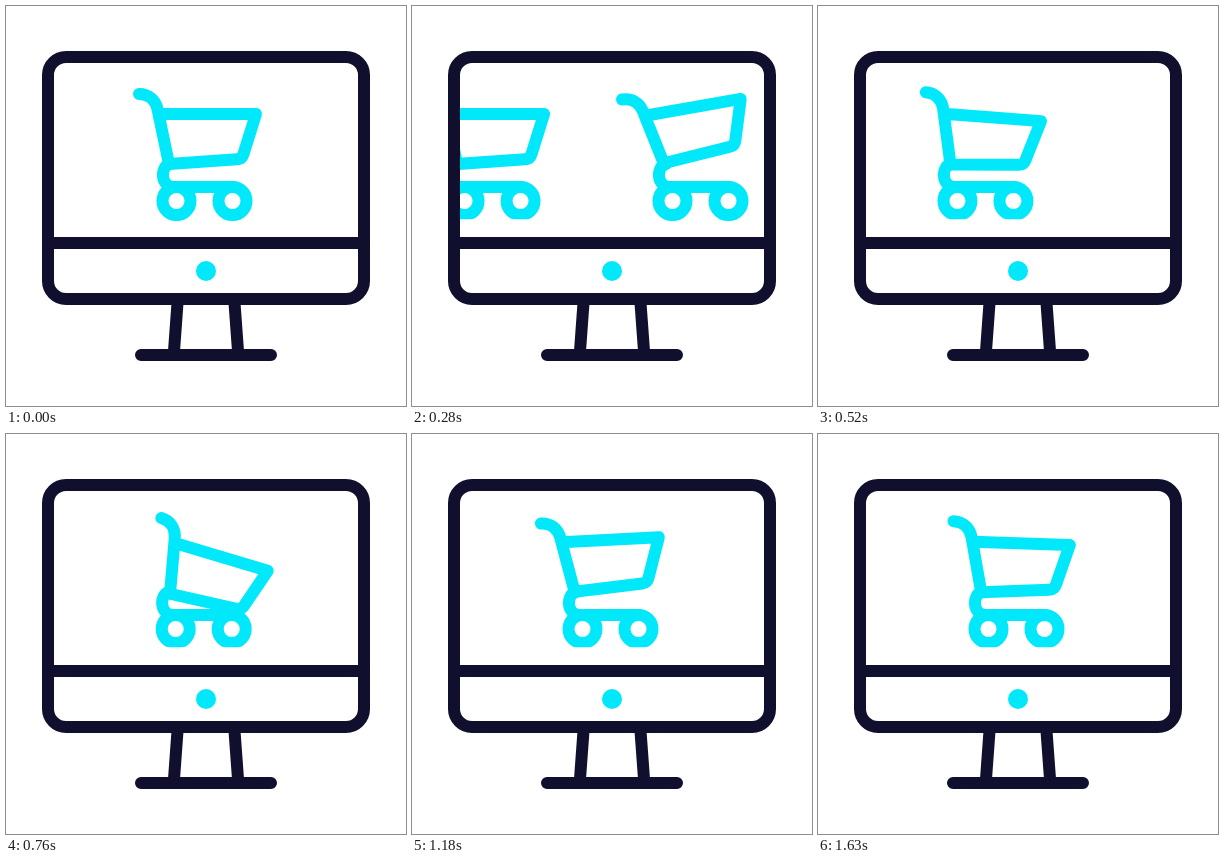
Recreate the animation shown at these times as an HTML page. Size 400 by 400 pixels, loop 1.66 s.

```html
<!DOCTYPE html>
<html lang="en">
<head>
<meta charset="utf-8">
<title>Shopping cart on a monitor</title>
<style>
  html, body { margin: 0; width: 100%; height: 100%; overflow: hidden; background: #fff; }
  svg { display: block; width: 100vw; height: 100vh; }
  .line { fill: none; stroke-width: 12; stroke-linecap: round; stroke-linejoin: round; }
  .dark { stroke: #10102e; }
  .cyan { stroke: #00e8fa; }
</style>
</head>
<body>
<svg viewBox="0 0 400 400">
  <defs>
    <clipPath id="screen"><rect x="47.5" y="57" width="305" height="174"/></clipPath>
    <clipPath id="lane"><rect x="47.5" y="57" width="305" height="156.3"/></clipPath>
    <g id="chassis">
      <path d="M164 158C154 160 154 181 168 181H226.5"/>
      <circle cx="170.5" cy="195" r="14"/>
      <circle cx="226.5" cy="195" r="14"/>
    </g>
    <path id="basket" d="M133 88C143 88 149.500 94.500 151.500 103L163 158L231 153.300Q236 153 237.500 148L250 108H153"/>
  </defs>

  <g class="line cyan" clip-path="url(#screen)">
    <g id="leaving"><use href="#chassis"/><use class="tilt" href="#basket"/></g>
  </g>
  <g class="line cyan" clip-path="url(#lane)">
    <g id="arriving"><use href="#chassis"/><use class="tilt" href="#basket"/></g>
  </g>

  <g class="line dark">
    <rect x="42" y="51" width="316" height="242" rx="18"/>
    <path d="M42 237H358M171.500 297L168 345M228.500 297L232 345M135 349H265"/>
  </g>
  <circle cx="200" cy="265" r="10" fill="#00e8fa"/>
</svg>
<script>
const LOOP = 1660, HOLD = 100, STEP = 30;

// Basket swing of the arriving cart: [step, degrees]
const SWING = [[0, 0], [11, 0], [23, 16.7], [38, -3.3], [53, 1.9]];

const smooth = u => {
  u = Math.min(1, Math.max(0, u));
  return u * u * (3 - 2 * u);
};

function swing(n) {
  const i = SWING.findIndex(k => k[0] > n);
  const [n0, a] = SWING[i - 1], [n1, b] = SWING[i];
  return a + (b - a) * smooth((n - n0) / (n1 - n0));
}

function pose(id, x, angle) {
  const cart = document.getElementById(id);
  cart.setAttribute("transform", `translate(${x.toFixed(2)} 0)`);
  cart.querySelector(".tilt").setAttribute("transform", `rotate(${angle.toFixed(2)} 158 165)`);
}

function draw(ms) {
  const t = ms % LOOP;
  const n = t < HOLD ? 0 : Math.floor((t - HOLD) / STEP) + 1;
  pose("leaving", 90 * (n / 7) ** 1.534, -10 * smooth(n / 6.5));
  pose("arriving", -0.1668 * Math.max(0, 25 - n) ** 2.27, swing(n));
}

const start = performance.now();
function tick() {
  draw(performance.now() - start);
  requestAnimationFrame(tick);
}
tick();
</script>
</body>
</html>
```
